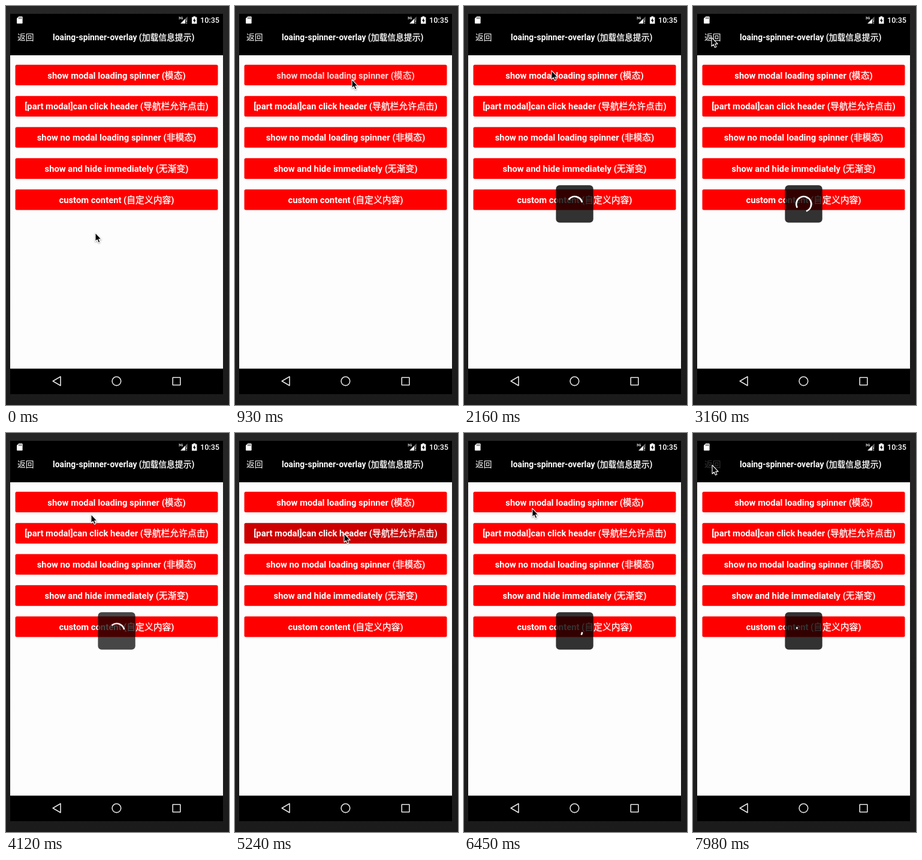
Animation of 372 by 664 pixels, one loop 8000 ms. Source, as an HTML page:

```html
<!DOCTYPE html>
<html lang="zh">
<head>
<meta charset="utf-8">
<title>Loading spinner overlay</title>
<style>
  html, body { margin: 0; width: 100%; height: 100%; overflow: hidden; background: #1e1e1e; }
  svg { display: block; width: 100%; height: 100%; }
  text { font-family: Roboto, "Noto Sans CJK SC", "Noto Sans CJK", sans-serif; fill: #fff; }
  .bold { font-weight: 700; text-anchor: middle; }
  .han { font-weight: 400; stroke: #fff; stroke-width: .35px; }
</style>
</head>
<body>
<svg viewBox="0 0 372 664" xmlns="http://www.w3.org/2000/svg">
  <defs>
    <linearGradient id="frame" x1="0" y1="0" x2="0" y2="1">
      <stop offset="0" stop-color="#262626"/>
      <stop offset="1" stop-color="#1b1b1b"/>
    </linearGradient>
  </defs>
  <rect width="372" height="664" fill="url(#frame)"/>
  <rect x="7" y="13" width="355" height="633" fill="#000"/>
  <rect x="7" y="82" width="355" height="521.5" fill="#fdfdfd"/>

  <!-- status bar -->
  <path d="M21.3 17.5H26.6Q27.6 17.5 27.6 18.5V28.3Q27.6 29.3 26.6 29.3H19Q18 29.3 18 28.3V20.8Z" fill="#fff"/>
  <path d="M21.7 19v2.4M23.7 19v2.4M25.7 19v2.4" stroke="#000" stroke-width=".9"/>
  <text x="287.8" y="22" font-size="6" font-weight="700">3G</text>
  <path d="M291 29.2L299.2 21V29.2Z" fill="#fff"/>
  <path d="M299.2 21L302.6 17.6V24H299.2Z" fill="#666"/>
  <path d="M301.3 24v3M301.3 28v1.3" stroke="#fff" stroke-width="1.3"/>
  <path d="M312.4 17.3H316V18.6H318.4V29.4H310V18.6H312.4Z" fill="#fff"/>
  <path d="M315 20.2L311.8 24.7H313.8V28L316.8 23.4H315Z" fill="#000"/>
  <text x="324" y="28.2" font-size="12.6" font-weight="500">10:35</text>

  <!-- header -->
  <text id="back" x="19" y="57" font-size="13.8">返回</text>
  <text class="bold" x="196.2" y="56.5" font-size="13.8">loaing-spinner-overlay (<tspan class="han">加载信息提示</tspan>)</text>

  <g id="buttons"></g>

  <!-- navigation bar -->
  <g fill="none" stroke="#e4e4e4" stroke-width="1.6" stroke-linejoin="round">
    <path d="M78.2 624.3L91 616.8V631.8Z"/>
    <circle cx="184.4" cy="624.3" r="7.3"/>
    <rect x="278.2" y="618.2" width="12.6" height="12.6"/>
  </g>

  <g id="overlay">
    <rect x="153.4" y="298.2" width="62.3" height="62.3" rx="6" fill="#000" fill-opacity=".8"/>
    <path id="arc" fill="none" stroke="#fff" stroke-width="2.6" stroke-linecap="square"/>
  </g>

  <path id="cursor" d="M0 -.6V14L3.2 11L5.4 16L7.9 14.9L5.8 10.1H10.2Z" fill="#000" stroke="#fff"
    stroke-width="1.1" stroke-linejoin="round" style="filter:drop-shadow(0 1px 1px rgba(0,0,0,.35))"/>
</svg>
<script>
const LOOP = 8000;
const $ = id => document.getElementById(id);

const labels = [
  ["show modal loading spinner", "模态"],
  ["[part modal]can click header", "导航栏允许点击"],
  ["show no modal loading spinner", "非模态"],
  ["show and hide immediately", "无渐变"],
  ["custom content", "自定义内容"]
];
$("buttons").innerHTML = labels.map(([name, note], i) => {
  const y = 97.8 + i * 51.85;
  return `<rect x="15.5" y="${y}" width="338" height="34.3" rx="2.5" fill="#f00"/>
    <text class="bold" x="184.5" y="${y + 22.8}" font-size="14.8">${name} (<tspan class="han">${note}</tspan>)</text>`;
}).join("");
const rects = $("buttons").querySelectorAll("rect");
const texts = $("buttons").querySelectorAll("text");

// Screen refreshes: start, end, number of steps
const bursts = [
  [350, 700, 7], [930, 1050, 3], [1230, 1980, 14], [2040, 2800, 14], [2860, 3640, 14], [3700, 4350, 12],
  [4650, 4830, 4], [5240, 6040, 14], [6100, 6860, 14], [6920, 7690, 14], [7750, 7980, 5]
];

// Pointer tip: time, x, y
const path = [
  [0, 149, 378], [300, 149, 378], [470, 185, 270], [590, 220, 150], [650, 210, 116], [700, 195, 123],
  [2000, 195, 123], [2400, 70, 85], [2560, 6, 62], [2800, 15, 57], [3100, 31, 53],
  [3700, 31, 53], [4000, 132, 128], [4114, 142, 136], [4300, 156, 126],
  [4600, 156, 126], [4830, 182, 168],
  [6100, 182, 168], [6450, 114, 126], [6860, 55, 94], [7150, 22, 47], [7400, 32, 54], [LOOP, 32, 54]
];

// Spinner runs: animation start, fade in, fade out
const runs = [[1240, 1240, 4090], [5284, 5345, Infinity]];

const clamp = v => Math.max(0, Math.min(1, v));
const ramp = (t, from, ms) => clamp((t - from) / ms);
const ease = v => v < .5 ? 2 * v * v : 1 - 2 * (1 - v) ** 2;

function refreshTime(t) {
  let shown = 0;
  for (const [from, to, count] of bursts) {
    if (t < from) break;
    const step = (to - from) / (count - 1);
    shown = from + step * Math.min(count - 1, Math.floor((t - from) / step + .15));
  }
  return shown;
}

function pointerAt(t) {
  const i = Math.max(1, path.findIndex(k => k[0] >= t));
  const [a, b] = [path[i - 1], path[i]];
  const p = ramp(t, a[0], b[0] - a[0]);
  return [1, 2].map(n => a[n] + (b[n] - a[n]) * p);
}

// Eased value of a cubic with the given control abscissas and ordinates 0, 0, 1, 1
function cubic(p, a, b, c, d) {
  let lo = 0, hi = 1;
  for (let i = 0; i < 24; i++) {
    const m = (lo + hi) / 2, n = 1 - m;
    const x = a * n ** 3 + 3 * b * n * n * m + 3 * c * n * m * m + d * m ** 3;
    if (x < p) lo = m; else hi = m;
  }
  return lo * lo * (3 - 2 * lo);
}

function arcAt(u) {
  const p = u / 1333 % 1;
  const base = u * 720 / 6665 + 90 * p;
  const head = p < .5 ? cubic(p, 0, .2, .1, .5) : 1;
  const tail = p > .5 ? cubic(p, .5, .7, .6, 1) : 0;
  const from = base + 270 * tail;
  const to = Math.max(from + 1, base + 270 * head);
  const point = deg => {
    const a = deg * Math.PI / 180;
    return `${184.8 + 12.5 * Math.sin(a)} ${329.6 - 12.5 * Math.cos(a)}`;
  };
  return `M${point(from)}A12.5 12.5 0 ${to - from > 180 ? 1 : 0} 1 ${point(to)}`;
}

function draw(time) {
  const t = refreshTime(time);
  $("cursor").setAttribute("transform", `translate(${pointerAt(t)})`);

  const press = ease(ramp(t, 880, 160)) - ease(ramp(t, 1300, 250));
  texts[0].setAttribute("opacity", 1 - .8 * press);
  rects[1].setAttribute("fill", t >= 5240 && t < 5420 ? "#c00" : "#f00");
  $("back").setAttribute("opacity", 1 - .8 * ease(ramp(t, 7480, 150)));

  const [start, fadeIn, fadeOut] = runs[t < 5000 ? 0 : 1];
  $("overlay").setAttribute("opacity", ramp(t, fadeIn, 170) * (1 - ramp(t, fadeOut, 250)));
  $("arc").setAttribute("d", arcAt(Math.max(0, t - start)));
}

const begin = performance.now();
function tick() {
  draw((performance.now() - begin) % LOOP);
  requestAnimationFrame(tick);
}
tick();
</script>
</body>
</html>
```
